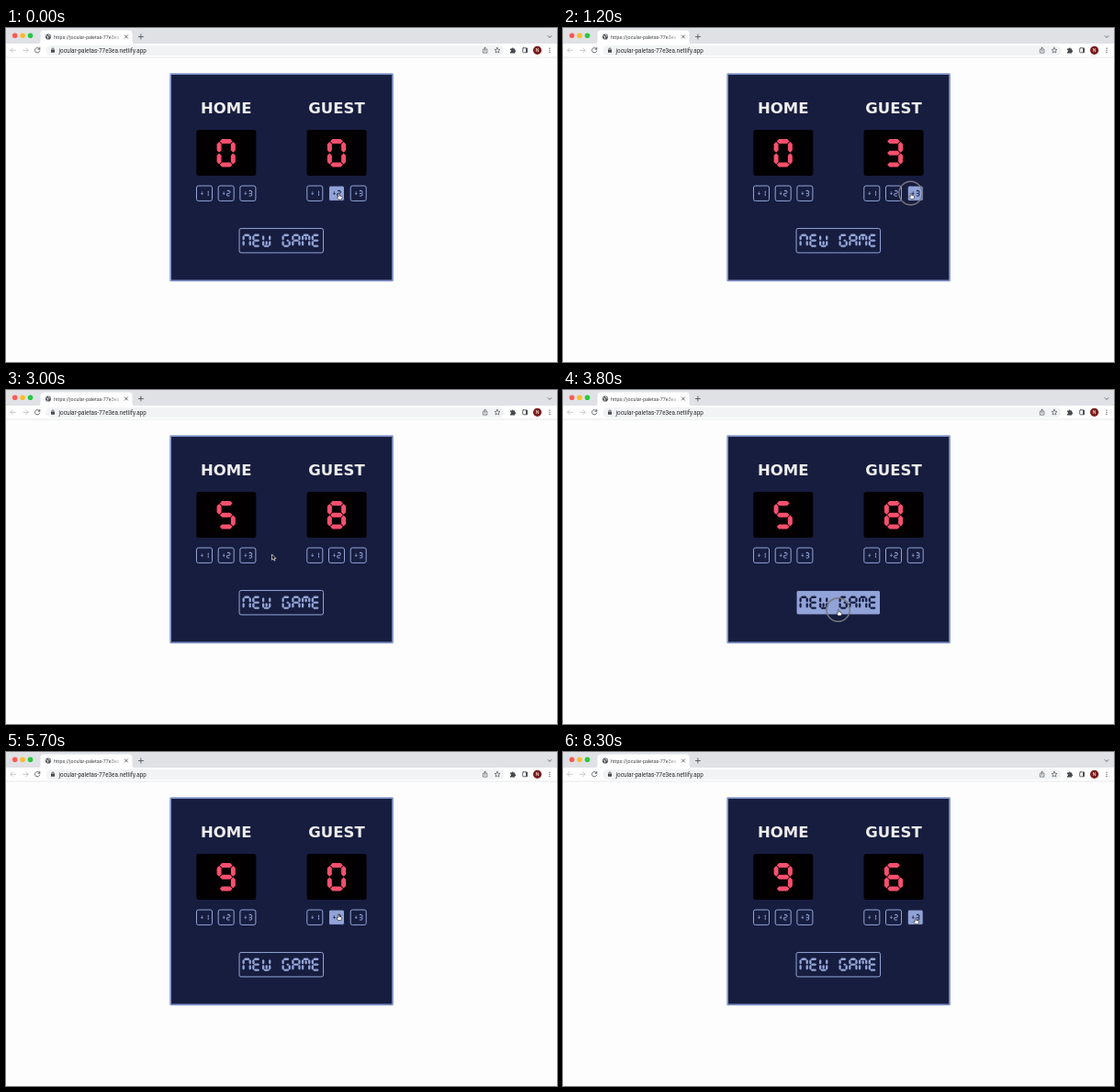
Write an HTML page that moves like this. It is 600x364 px and loops after 8400 ms.

```html
<!DOCTYPE html>
<html lang="en">
<head>
<meta charset="utf-8">
<title>Scoreboard</title>
<style>
  html, body { margin: 0; width: 100%; height: 100%; overflow: hidden; background: #fdfdfd; }
  svg { display: block; }
  .ui { font-family: Roboto, "Open Sans", sans-serif; fill: #2b2d30; }
  .team { font: bold 16.5px "DejaVu Sans", sans-serif; fill: #eee; text-anchor: middle; }
  .icon { fill: none; stroke: #55585c; stroke-width: .9; stroke-linecap: round; stroke-linejoin: round; }
  .button rect { fill: none; stroke: #94a6d8; stroke-width: 1; }
  .button path { fill: #94a6d8; }
  .button.hover rect { fill: #91a3d8; stroke: #171d3f; }
  .button.hover path { fill: #171d3f; }
</style>
</head>
<body>
<svg id="stage" width="600" height="364" viewBox="0 0 600 364"></svg>
<script>
const LOOP = 8400, STEP = 100;
const stage = document.getElementById('stage');

// Segment display: glyph cell is 20 x 30; each segment is [vertical?, fixed axis, start, end].
const SEGMENTS = {
  a: [0, 2.5, 3.2, 16.8], g: [0, 15, 3.2, 16.8], d: [0, 27.5, 3.2, 16.8], h: [0, 15, 10, 16.8],
  f: [1, 2.5, 3, 14.6], e: [1, 2.5, 15.4, 27],
  b: [1, 17.5, 3, 14.6], c: [1, 17.5, 15.4, 27],
  i: [1, 10, 5, 14.6], l: [1, 10, 15.4, 25],
  p: [1, 10, 6.5, 12], q: [1, 10, 18, 23.5]
};
const GLYPHS = {
  0: 'abcdef', 1: 'bc', 2: 'abged', 3: 'abgcd', 4: 'fgbc', 5: 'afgcd', 6: 'afgecd',
  7: 'abc', 8: 'abcdefg', 9: 'abcdfg', '+': 'gpq',
  N: 'abcef', E: 'adefg', W: 'bcdefl', G: 'acdefh', A: 'abcefg', M: 'abcefi', ' ': ''
};
const PITCH = 22.7;

function segmentPath(name, dx) {
  const [vertical, axis, start, end] = SEGMENTS[name], h = 2.45;
  const points = [[start, 0], [start + h, -h], [end - h, -h], [end, 0], [end - h, h], [start + h, h]]
    .map(([along, across]) => vertical ? [axis + across + dx, along] : [along + dx, axis + across]);
  return 'M' + points.map(p => p.join(' ')).join('L') + 'Z';
}

const textPath = text => [...text].map((ch, n) =>
  [...GLYPHS[ch]].map(s => segmentPath(s, n * PITCH)).join('')).join('');

function segmentText(text, cx, cy, height, attrs = '') {
  const scale = height / 30;
  const width = ((text.length - 1) * PITCH + 20) * scale;
  return `<path ${attrs} transform="translate(${cx - width / 2} ${cy - height / 2}) scale(${scale})" d="${textPath(text)}"/>`;
}

const buttons = [{ label: 'NEW GAME', cx: 299.8, cy: 231.7, w: 91.5, h: 26.5, size: 14.2 }];
[239.7, 360].forEach((center, team) => [1, 2, 3].forEach(points => buttons.push({
  label: '+' + points, cx: center + (points - 2) * 23.7, cy: 180.2, w: 17, h: 16.4, size: 6.7, team, points
})));

const buttonMarkup = b => `<g class="button">
  <rect x="${b.cx - b.w / 2}" y="${b.cy - b.h / 2}" width="${b.w}" height="${b.h}" rx="2"/>
  ${segmentText(b.label, b.cx, b.cy, b.size)}</g>`;

const teamMarkup = (name, cx) => `
  <text class="team" x="${cx}" y="93">${name}</text>
  <rect x="${cx - 32.4}" y="111" width="65" height="50" rx="2.5" fill="#030002"/>
  ${segmentText('0', cx, 136.2, 30.5, 'class="score" fill="#f94f6d"')}`;

const browserMarkup = `
  <rect width="600" height="18" fill="#dfe1e5"/>
  <rect y="17" width="600" height="15" fill="#fff"/>
  <path d="M0 32H600" stroke="#dcdee1" stroke-width=".7"/>
  <path d="M34 17.5Q37.5 17.5 37.5 14V6Q37.5 2.5 41 2.5H134Q137.5 2.5 137.5 6V14Q137.5 17.5 141 17.5Z" fill="#fff"/>
  ${['#fc5b57', '#fdbc2f', '#29c740'].map((c, n) =>
    `<circle cx="${9.7 + n * 8.4}" cy="8.2" r="2.8" fill="${c}"/>`).join('')}
  <circle cx="46" cy="9.5" r="3.1" fill="#55585c"/>
  <path d="M43.6 8.5L46 9.5 45.2 11.7M46.4 7L47.2 8.6 48.6 9" fill="none" stroke="#fff" stroke-width=".8"/>
  <text class="ui" x="52" y="11.5" font-size="5.35" style="fill:url(#fade)">https://jocular-paletas-77e3ea</text>
  <path class="icon" d="M129.3 7.9l3.2 3.2m0-3.2l-3.2 3.2M144.4 9.5h5m-2.5-2.5v5M590.2 8.6l1.8 1.8 1.8-1.8"/>
  <rect x="43.5" y="18.9" width="499" height="11" rx="5.5" fill="#f1f3f4"/>
  <g class="icon">
    <path d="M10.3 24.3H5m2.3-2.4L4.9 24.3l2.4 2.4M18.8 24.3h5.3m-2.3-2.4l2.4 2.4-2.4 2.4" stroke="#bfc2c6"/>
    <path d="M36.5 22.8A2.7 2.7 0 1 0 36.8 25M36.8 21.4V23.2H35"/>
    <path d="M49.9 24v-1a1.1 1.1 0 0 1 2.2 0v1"/>
    <path d="M520.4 23.3h-1v3.8h4.5v-3.8h-1M521.65 25.3V21.2m-1.3 1.2l1.3-1.3 1.3 1.3" stroke-width=".7"/>
    <path d="M535 21.3l.9 2 2.1.2-1.6 1.4.5 2.1-1.9-1.1-1.9 1.1.5-2.1-1.6-1.4 2.1-.2Z" stroke-width=".7"/>
    <rect x="562.7" y="21.8" width="5" height="5" rx=".6"/>
  </g>
  <path d="M49 23.8h4v3h-4ZM566 22h1.7v4.8H566ZM549 22.6h1.6a1 1 0 0 1 2 0h1.6v1.6a1 1 0 0 1 0 2v1.2H549v-1.4a1 1 0 0 0 0-2Z" fill="#484b4f"/>
  <text class="ui" x="57.6" y="26.6" font-size="6.36">jocular-paletas-77e3ea.netlify.app</text>
  <circle cx="578.6" cy="24.3" r="4.6" fill="#7c1d1d"/>
  <text class="ui" x="578.6" y="26.2" font-size="5.2" text-anchor="middle" style="fill:#fff">N</text>
  ${[-2.1, 0, 2.1].map(dy => `<circle cx="592" cy="${24.3 + dy}" r=".65" fill="#484b4f"/>`).join('')}`;

stage.innerHTML = `
  <defs><linearGradient id="fade" gradientUnits="userSpaceOnUse" x1="112" x2="125">
    <stop stop-color="#3c4043"/><stop offset="1" stop-color="#3c4043" stop-opacity=".15"/>
  </linearGradient></defs>
  <rect width="600" height="364" fill="#fdfdfd"/>
  ${browserMarkup}
  <rect x="179.2" y="50.2" width="241.8" height="225.2" rx=".5" fill="#171d3f" stroke="#7f92c6" stroke-width="1.7"/>
  ${teamMarkup('HOME', 239.7)}
  ${teamMarkup('GUEST', 360)}
  ${buttons.map(buttonMarkup).join('')}
  <circle id="ring" fill="none" stroke="#77777b" stroke-width="1.4"/>
  <path id="arrow" d="M0 0V6.2L1.5 4.9 2.5 7.1 3.5 6.6 2.6 4.5H4.5Z" fill="#111" stroke="#eee" stroke-width=".7"/>
  <path id="hand" d="M-.7.2Q0-.6.7.2V2.4L3.2 3Q3.8 3.3 3.6 4.2L2.9 6.4H-.4L-2.2 3.9Q-2.2 3-.7 3.9Z" fill="#fff" stroke="#222" stroke-width=".6"/>`;

const ring = document.getElementById('ring');
const arrow = document.getElementById('arrow');
const hand = document.getElementById('hand');
const scores = [...stage.querySelectorAll('.score')];
const buttonNodes = [...stage.querySelectorAll('.button')];

// Pointer stops: [time, x, y]
const route = [
  [0, 362.5, 180.5], [100, 362.5, 180.5], [400, 337, 181], [520, 337, 181], [700, 362.8, 181],
  [850, 362.8, 181], [1100, 379, 180], [1350, 379, 180], [1550, 362, 180], [1700, 362, 180],
  [2150, 240, 181], [2300, 240, 181], [2500, 262, 181], [2700, 262, 181], [3000, 289.5, 179],
  [3500, 291, 183], [3800, 300, 239.5], [4050, 300, 239.5], [4600, 257, 169.3], [4800, 262, 179],
  [5350, 262, 179], [5700, 362, 177], [6050, 337, 179], [6200, 337, 179], [6450, 361, 178],
  [6560, 361, 178], [6700, 373.8, 177], [6850, 384, 181], [LOOP, 384, 181]
];
const clicks = [480, 800, 1300, 1650, 2250, 2600, 3950, 4850, 5050, 5250, 6100, 6550, 7250];

function pointerAt(t) {
  const n = Math.max(1, route.findIndex(stop => stop[0] >= t));
  const [t0, x0, y0] = route[n - 1], [t1, x1, y1] = route[n];
  const k = (t - t0) / (t1 - t0), ease = k * k * (3 - 2 * k);
  return [x0 + (x1 - x0) * ease, y0 + (y1 - y0) * ease];
}

const buttonAt = ([x, y]) => buttons.find(b =>
  Math.abs(x - b.cx) < b.w / 2 && Math.abs(y - b.cy) < b.h / 2);

function scoresAt(t) {
  let total = [0, 0];
  for (const time of clicks.filter(c => c <= t)) {
    const target = buttonAt(pointerAt(time));
    if (!target) continue;
    if (target.points) total[target.team] += target.points;
    else total = [0, 0];
  }
  return total;
}

function render(t) {
  const [x, y] = pointerAt(t), hovered = buttonAt([x, y]);
  scoresAt(t).forEach((value, n) => scores[n].setAttribute('d', textPath(String(value))));
  buttonNodes.forEach((node, n) => node.classList.toggle('hover', buttons[n] === hovered));
  for (const [node, shown] of [[hand, hovered], [arrow, !hovered]]) {
    node.setAttribute('transform', `translate(${x} ${y})`);
    node.setAttribute('visibility', shown ? 'visible' : 'hidden');
  }
  const click = clicks.find(c => t >= c - 150 && t < c + 200);
  const release = click === undefined ? 1 : Math.max(0, (t - click) / 200);
  ring.setAttribute('cx', x - .4);
  ring.setAttribute('cy', y);
  ring.setAttribute('r', 12.7 - release * 5);
  ring.setAttribute('opacity', release < 1 ? 1 - release * .4 : 0);
}

function tick(now) {
  render(Math.floor(now % LOOP / STEP) * STEP);
  requestAnimationFrame(tick);
}
render(0);
requestAnimationFrame(tick);
</script>
</body>
</html>
```
